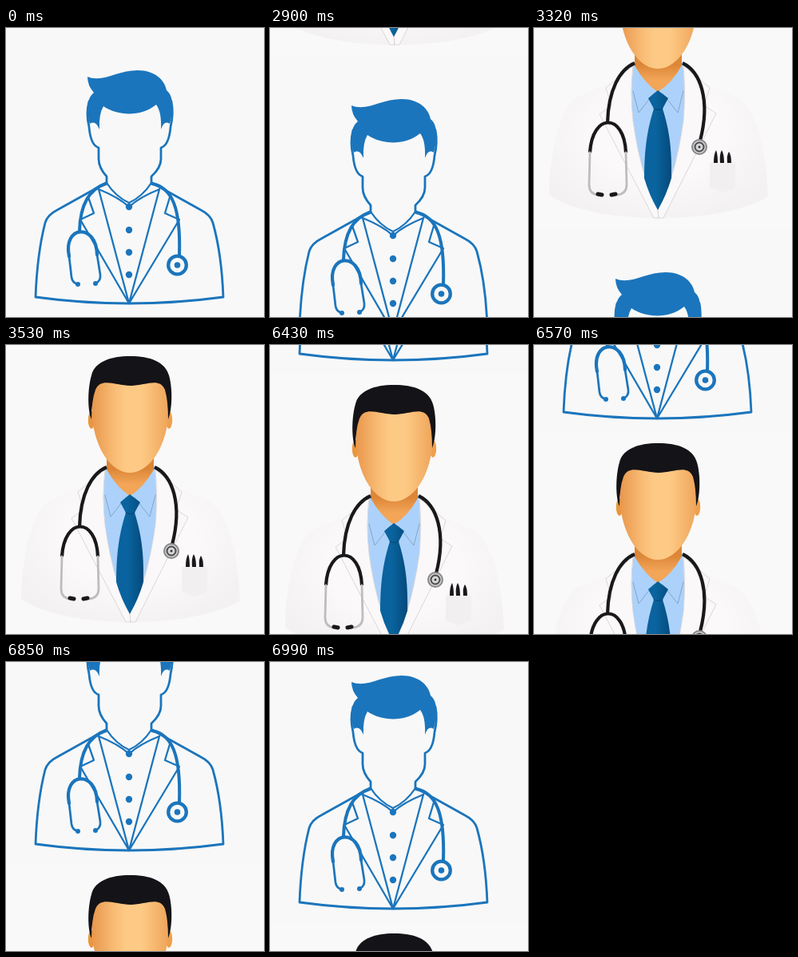
These frames come from a looping animation (323x362 px, 7060 ms). An HTML page:

```html
<!DOCTYPE html>
<html lang="en">
<head>
<meta charset="utf-8">
<title>Doctor</title>
<style>
html, body { margin: 0; width: 100%; height: 100%; overflow: hidden; background: #f8f8f8; }
svg { display: block; width: 100%; height: 100%; }
</style>
</head>
<body>
<svg viewBox="0 0 323 362" fill="none" stroke-linejoin="round" stroke-linecap="round">
  <defs>
    <linearGradient id="skin">
      <stop offset="0" stop-color="#e9974c"/><stop offset=".28" stop-color="#f8bb74"/>
      <stop offset=".45" stop-color="#fdca85"/><stop offset=".65" stop-color="#fdca85"/>
      <stop offset="1" stop-color="#efa55b"/>
    </linearGradient>
    <linearGradient id="neck" x2="0" y2="1">
      <stop offset=".3" stop-color="#dc8637"/><stop offset=".7" stop-color="#f3a558"/>
    </linearGradient>
    <linearGradient id="tie">
      <stop offset="0" stop-color="#0a629d"/><stop offset=".4" stop-color="#0a649f"/>
      <stop offset="1" stop-color="#044a7c"/>
    </linearGradient>
    <radialGradient id="coat" cx=".5" cy=".45" r=".58">
      <stop offset=".5" stop-color="#fbf9fa"/><stop offset="1" stop-color="#f4f1f3"/>
    </radialGradient>
  </defs>

  <g id="outline">
    <rect width="323" height="362" fill="#f8f8f8"/>
    <g stroke="#1b75bc" stroke-width="2.8">
      <!-- torso, collar and lapels -->
      <path d="M125 194L64 228Q52 234 49 244Q39 283 37 337Q154 353 272 337Q270 283 259 244Q256 234 244 228L183 194"/>
      <path d="M126 194Q137 211 154 219Q171 211 182 194M116 202Q141 212 154 224Q167 212 192 202" stroke-width="2.3"/>
      <path d="M116 202L154 345L192 202M103 212L110 232L93 240L154 345L217 240L199 232L205 212" stroke-width="2.3"/>
      <!-- head -->
      <path d="M104 92Q100 107 104 124Q106 147 116 150V164Q116 175 126 186V195M207 92Q210 107 206 124Q204 147 194 150V164Q194 175 182 186V195"/>
      <path d="M102 61C121 69 139 53 165 53C187 53 199 66 201 78C211 86 209 105 205 120Q198 115 194 127Q195 105 188 96C168 112 140 110 122 98Q116 108 117 127Q112 115 105 120C100 104 101 88 110 81Q102 72 102 61Z" fill="#1b75bc" stroke="none"/>
      <!-- stethoscope -->
      <path d="M125 195C103 202 93 222 92 254M183 195C208 200 219 225 217 285" stroke-width="4"/>
      <path d="M79 286C71 247 113 244 114 284" stroke-width="4.2"/>
      <path d="M79 286L82 312Q83 319 90 321M114 284L118 309Q119 317 112 320" stroke-width="2.7"/>
      <circle cx="214.5" cy="297" r="11.3" stroke-width="4.3"/>
    </g>
    <g fill="#1b75bc">
      <circle cx="154" cy="224" r="4.2"/><circle cx="154" cy="253" r="4.2"/>
      <circle cx="154" cy="281" r="4.2"/><circle cx="154" cy="309" r="4.2"/>
      <circle cx="214.5" cy="297" r="3.8"/>
      <circle cx="90" cy="321" r="3"/><circle cx="112" cy="320" r="3"/>
    </g>
  </g>

  <g id="colored">
    <rect width="323" height="362" fill="#f9f9f9"/>
    <path d="M124 155L91 180L57 194C33 204 20 264 19 318C42 335 94 347 156 347C218 347 268 336 293 320C291 264 279 209 253 195L219 180L187 155Z" fill="url(#coat)"/>
    <path d="M125 152H186Q190 190 187 225Q182 262 172 296L155 325L139 296Q129 262 124 225Q120 190 125 152Z" fill="#acd2fb"/>
    <path d="M126 140H185V156Q172 179 155 189Q139 179 126 156Z" fill="url(#neck)"/>
    <path d="M124 188L131 215L150 191M187 188L180 215L161 191" stroke="#829fbd" stroke-width=".9"/>
    <!-- lapels -->
    <g fill="#faf8f9" stroke="#d2cfd1" stroke-width=".8">
      <path d="M124 156L90 184L97 206L82 217L150 347H156L155 336L139 296Q129 262 124 225Q120 190 124 156Z"/>
      <path d="M187 156L220 184L213 206L228 216L162 347H156L155 336L172 296Q182 262 187 225Q190 190 187 156Z"/>
    </g>
    <path d="M155 187L168 197L161 210C169 235 173 260 172 297Q166 318 155 337Q144 318 138 297C138 260 142 235 150 210L143 197Z" fill="url(#tie)"/>
    <path d="M150 210Q155 213 161 210" stroke="#04446f"/>
    <!-- head -->
    <ellipse cx="107" cy="94" rx="4.2" ry="11" fill="#e9963f"/>
    <ellipse cx="204" cy="94" rx="4.2" ry="11" fill="#f0a04d"/>
    <path d="M108 46H203V92C199 131 178 160 155 160C132 160 112 131 108 92Z" fill="url(#skin)"/>
    <path d="M107 93C102 82 102 55 107 38C111 21 131 14 155 14C181 14 199 21 204 38C209 55 208 82 203 93Q203 70 199 56C192 40 175 51 156 51C137 51 119 40 112 56Q107 70 107 93Z" fill="#141317"/>
    <!-- stethoscope -->
    <path d="M126 153C107 161 93 187 92 228M186 153C209 164 221 200 208 250M70 265C73 215 113 215 115 265" stroke="#19181b" stroke-width="4.2" stroke-linecap="butt"/>
    <path d="M70 265L69 305Q69 317 80 318M115 265L116 305Q116 317 104 318" stroke="#bdbdbf" stroke-width="2.8"/>
    <path d="M80 317L85 318M97 318L102 317" stroke="#19181b" stroke-width="5"/>
    <circle cx="207" cy="258" r="9" fill="#cfcfd0" stroke="#88888b" stroke-width="2"/>
    <circle cx="207" cy="258" r="5.5" fill="#d6d6d7" stroke="#4c4c4f" stroke-width="2"/>
    <circle cx="207" cy="258" r="1.5" fill="#333"/>
    <!-- pocket -->
    <path d="M225 278Q225 267 228 262Q230 267 230 278ZM233 278Q232 267 235 262Q238 267 238 278ZM242 278Q241 268 244 264Q247 268 247 278Z" fill="#19181b"/>
    <path d="M220 278H252V309L236 315L220 309Z" fill="#f2eff1"/>
  </g>
</svg>
<script>
const HEIGHT = 362, HOLD = 2900, STEP = 70, STEPS = 10;
const HALF = HOLD + STEP * (STEPS - 1);
const outline = document.getElementById("outline");
const colored = document.getElementById("colored");
const start = performance.now();

function place(group, y) {
  group.setAttribute("transform", `translate(0 ${y})`);
}

// Each picture rests, then is pushed down in equal steps by the other one.
function draw() {
  const t = (performance.now() - start) % (2 * HALF);
  const local = t % HALF;
  const step = local < HOLD ? 0 : Math.floor((local - HOLD) / STEP) + 1;
  const shift = Math.round(HEIGHT * step / STEPS);
  const [current, next] = t < HALF ? [outline, colored] : [colored, outline];
  place(current, shift);
  place(next, shift - HEIGHT);
  requestAnimationFrame(draw);
}
draw();
</script>
</body>
</html>
```
